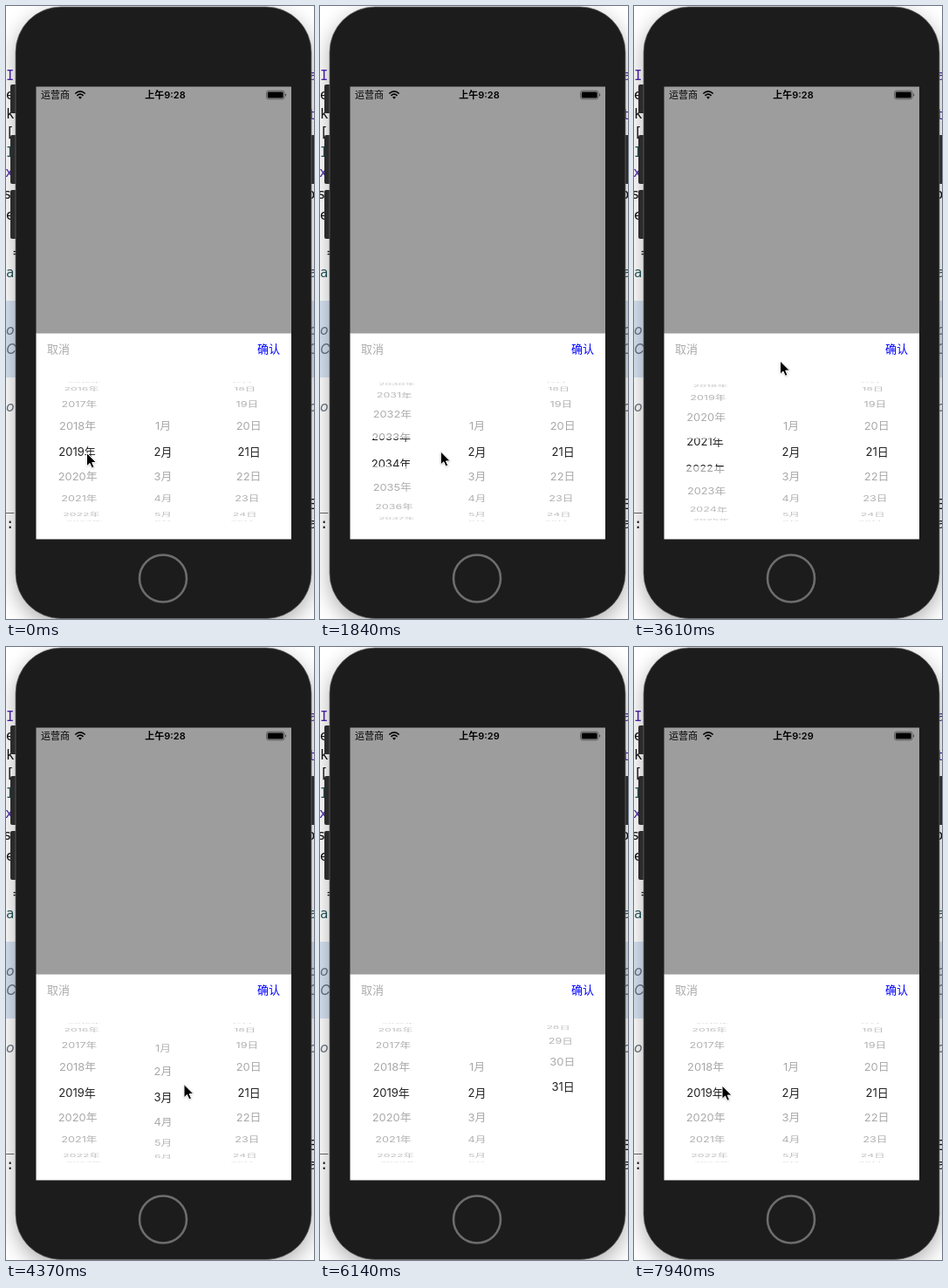
Write an HTML page that moves like this. It is 353x703 px and loops after 8000 ms.

```html
<!DOCTYPE html>
<html lang="zh-CN">
<head>
<meta charset="utf-8">
<title>日期选择器</title>
<style>
  html, body { margin: 0; width: 100%; height: 100%; overflow: hidden; background: #fff; }
  svg { display: block; width: 353px; height: 703px; }
  text { font-family: Inter, "Noto Sans CJK SC", "Noto Sans CJK JP", "Noto Sans CJK", sans-serif; font-size: 13px; }
  .code text { font: 15.5px "DejaVu Sans Mono", monospace; }
  .code .note { font: italic 16px Inter, sans-serif; fill: #65717f; }
  .status text { font-size: 11px; }
  .status .clock { font-weight: 600; text-anchor: middle; }
  .wheel text { text-anchor: middle; }
  .rim { fill: #a0a0a0; }
  .band { fill: #222; }
</style>
</head>
<body>
<svg viewBox="0 0 353 703">
  <defs>
    <filter id="blur" x="-20%" y="-20%" width="140%" height="140%"><feGaussianBlur stdDeviation="12"/></filter>
    <filter id="soft" x="-50%" y="-50%" width="200%" height="200%"><feGaussianBlur stdDeviation=".8"/></filter>
    <clipPath id="outside"><path d="M34 429H327V496H34zM34 528H327V593H34z"/></clipPath>
    <clipPath id="inside"><path d="M34 496H327V528H34z"/></clipPath>
  </defs>

  <rect width="353" height="703" fill="#fff"/>
  <g class="code">
    <path d="M0 338H353V426H0z" fill="#d8e4f4"/>
    <g fill="#4b21b0">
      <text x="0" y="85">I</text><text x="-1" y="196">x</text>
      <text x="347" y="85">a</text><text x="346" y="130">t</text>
    </g>
    <g fill="#111">
      <text x="0" y="107">e</text><text x="0" y="129">k</text><text x="0" y="150">[</text>
      <text x="-3" y="221">s</text><text x="0" y="245">e</text><text x="8" y="288">=</text>
      <text x="345" y="221">o</text>
      <text x="0" y="578">_</text><text x="0" y="599">:</text>
      <text x="346" y="577">E</text><text x="347" y="599">a</text>
    </g>
    <g fill="#23575c">
      <text x="0" y="173">I</text><text x="0" y="311">a</text><text x="347" y="311">a</text>
    </g>
    <text class="note" x="0" y="377">o</text><text class="note" x="0" y="399">C</text>
    <text class="note" x="0" y="465">o</text>
    <text class="note" x="347" y="377">o</text><text class="note" x="346" y="399">C</text>
    <text class="note" x="347" y="465">o</text>
  </g>

  <rect x="11" y="9" width="339" height="701" rx="52" opacity=".32" filter="url(#blur)"/>
  <g fill="#2b2b2b">
    <rect x="5" y="90" width="8" height="33" rx="2"/>
    <rect x="5" y="148" width="8" height="56" rx="2"/>
    <rect x="5" y="211" width="8" height="56" rx="2"/>
    <rect x="348" y="148" width="8" height="56" rx="2"/>
  </g>
  <rect x="11" y="1" width="339" height="701.5" rx="52" fill="#1c1c1c" stroke="#6a6a6a" stroke-width=".7"/>
  <circle cx="180" cy="656.5" r="27" fill="none" stroke="#6d6d6d" stroke-width="2.6"/>
  <path d="M34.5 92.5H327V376H34.5z" fill="#9d9d9d"/>
  <path d="M34.5 375.5H327V611.5H34.5z" fill="#fff"/>

  <g class="status">
    <text x="40" y="106">运营商</text>
    <path d="M79.3 100.5Q85 95.2 90.7 100.5M81.4 102.8Q85 99.6 88.6 102.8" fill="none" stroke="#000" stroke-width="1.7"/>
    <path d="M83 104.6Q85 103 87 104.6L85 106.7z"/>
    <text id="clock" class="clock" x="182.5" y="106">上午9:28</text>
    <rect x="298.5" y="97.2" width="20.5" height="9.6" rx="2.4" fill="none" stroke="#4d4d4d" stroke-width=".8"/>
    <rect x="299.8" y="98.5" width="17.9" height="7" rx="1.3"/>
    <path d="M320 100.3Q322.6 102 320 103.7z" fill="#4d4d4d"/>
  </g>

  <text x="47" y="397.8" fill="#aaa">取消</text>
  <text x="288" y="397.8" fill="#00f">确认</text>

  <g class="wheel">
    <g id="rim" class="rim" clip-path="url(#outside)"></g>
    <g id="band" class="band" clip-path="url(#inside)"></g>
  </g>

  <g id="cursor">
    <path d="M0 1V16L3.7 12.6 6 18 8.8 17 6.4 11.6H11.5z" opacity=".3" filter="url(#soft)"/>
    <path d="M0 0V15.3L3.5 12 5.8 17.3 8.5 16.2 6.2 11.1H11z" stroke="#fff" stroke-width="1" stroke-linejoin="round"/>
  </g>
</svg>
<script>
const LOOP = 8000, ROWS = 11;
const RADIUS = 79.5, STEP = 0.374, BAND_PITCH = 32;
const CENTER = { x: 180, y: 511 };
const $ = id => document.getElementById(id);

// Progress from 0 to 1 between two times.
const ramp = (t, from, to) => Math.min(1, Math.max(0, (t - from) / (to - from)));
const smooth = (t, from, to) => (1 - Math.cos(Math.PI * ramp(t, from, to))) / 2;
const glide = (t, from, to, power) => 1 - (1 - ramp(t, from, to)) ** power;

// Each wheel is spun forward and then back to its first value.
const year = t => 2019 + 18.35 * (glide(t, 30, 2500, 1.19) - glide(t, 2500, 4130, 1.79));
const month = t => 2 + 1.1 * (smooth(t, 4050, 4230) - smooth(t, 4270, 4580));
const day = t => 21 + 10.22 * (smooth(t, 4930, 5960) - smooth(t, 6180, 6880));

// How far the pointer is raised, 0 to 1, while it swings over the year wheel.
function swing(t) {
  const period = 1150, firstTop = 1310, end = firstTop + 2.5 * period;
  if (t < firstTop) return smooth(t, 0, firstTop);
  return t < end ? (1 + Math.cos(2 * Math.PI * (t - firstTop) / period)) / 2 : 0;
}

function cursorAt(t) {
  if (t >= 7230) {
    const back = smooth(t, 7230, 7940);
    return { x: 317 - 216 * back, y: 472 + 31 * back };
  }
  const reach = 120.5 - 15 * ramp(t, 1310, 3610);
  return {
    x: 92.5 + 37 * ramp(t, 0, 1310) + 38 * ramp(t, 1310, 3610) + 36.5 * smooth(t, 3610, 4370)
      + 82.5 * smooth(t, 4370, 4600) + 42 * smooth(t, 4930, 5930),
    y: 512.5 - reach * swing(t) - 11 * smooth(t, 4100, 4370)
      - 60 * Math.sin(Math.PI * ramp(t, 4930, 5930)) ** 2
  };
}

function makeRows(parent) {
  return Array.from({ length: ROWS }, () => {
    const row = document.createElementNS("http://www.w3.org/2000/svg", "text");
    row.setAttribute("y", 4.7);
    return parent.appendChild(row);
  });
}

function placeRow(row, label, x, y, scaleX = 1, scaleY = 1) {
  row.textContent = label;
  row.setAttribute("transform", `translate(${x} ${y}) scale(${scaleX} ${scaleY})`);
}

function makeWheel(x, unit, min, max, position) {
  const rim = makeRows($("rim")), band = makeRows($("band"));
  return t => {
    const pos = position(t), first = Math.round(pos) - (ROWS - 1) / 2;
    for (let i = 0; i < ROWS; i++) {
      const value = first + i, offset = value - pos;
      const depth = Math.cos(offset * STEP), scale = 1 - 0.09 * (1 - depth);
      const shown = value >= min && value <= max && Math.abs(offset * STEP) < Math.PI / 2;
      const label = shown ? value + unit : "";
      placeRow(rim[i], label, CENTER.x + (x - CENTER.x) * scale,
        CENTER.y + RADIUS * Math.sin(offset * STEP), scale, scale * depth);
      placeRow(band[i], label, x, CENTER.y + BAND_PITCH * offset);
      rim[i].setAttribute("opacity", 0.5 + 0.45 * depth);
    }
  };
}

const wheels = [
  makeWheel(81.5, "年", 1900, 2100, year),
  makeWheel(180, "月", 1, 12, month),
  makeWheel(278.7, "日", 1, 31, day)
];

function draw(t) {
  const { x, y } = cursorAt(t);
  wheels.forEach(wheel => wheel(t));
  $("clock").textContent = t < 5350 ? "上午9:28" : "上午9:29";
  $("cursor").setAttribute("transform", `translate(${x} ${y})`);
  $("cursor").setAttribute("visibility", t > 5930 && t < 7230 ? "hidden" : "visible");
}

const start = performance.now();
function tick() {
  draw((performance.now() - start) % LOOP);
  requestAnimationFrame(tick);
}
tick();
</script>
</body>
</html>
```
